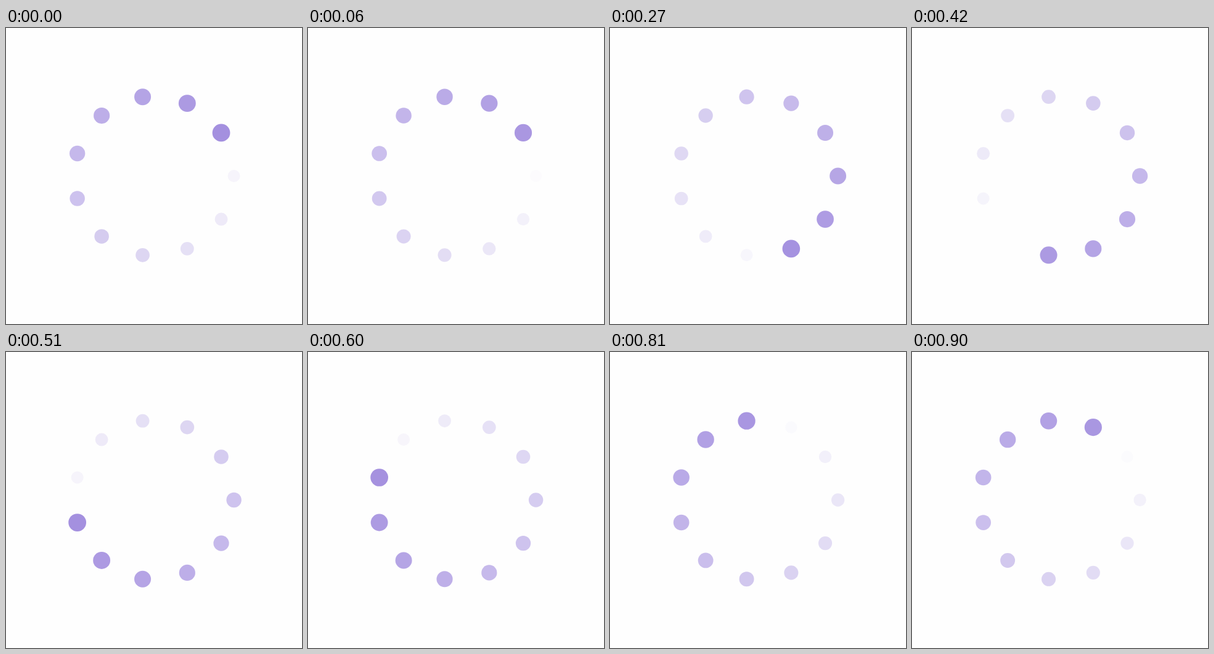
An HTML page for the animation above (0.93 s loop, 480 by 480 pixels).

```html
<!DOCTYPE html>
<html lang="en">
<head>
<meta charset="utf-8">
<title>Spinner</title>
<style>
  html, body { margin: 0; width: 100%; height: 100%; overflow: hidden; background: #fefefe; }
  svg { display: block; width: 100vw; height: 100vh; }
</style>
</head>
<body>
<svg id="stage" viewBox="0 0 480 480" fill="#a490df"></svg>
<script>
const LOOP = 930, STEP = 30;
const COUNT = 11, CENTER = 240, RING = 129.6, DOT = 9.6;

const stage = document.getElementById('stage');
const dots = Array.from({ length: COUNT }, (_, i) => {
  const angle = i / COUNT * Math.PI * 2;
  const dot = document.createElementNS('http://www.w3.org/2000/svg', 'circle');
  dot.setAttribute('cx', CENTER + RING * Math.cos(angle));
  dot.setAttribute('cy', CENTER + RING * Math.sin(angle));
  return stage.appendChild(dot);
});

// Each dot appears large and solid, then shrinks and fades over one loop.
function draw(ms) {
  const phase = Math.floor(ms % LOOP / STEP) * STEP / LOOP;
  dots.forEach((dot, i) => {
    const age = (phase + (COUNT - 1 - i) / COUNT) % 1;
    dot.setAttribute('r', DOT * (1.5 - 0.5 * age));
    dot.setAttribute('opacity', 1 - age);
  });
}

let start;
function tick(now) {
  start ??= now;
  draw(now - start);
  requestAnimationFrame(tick);
}
draw(0);
requestAnimationFrame(tick);
</script>
</body>
</html>
```
